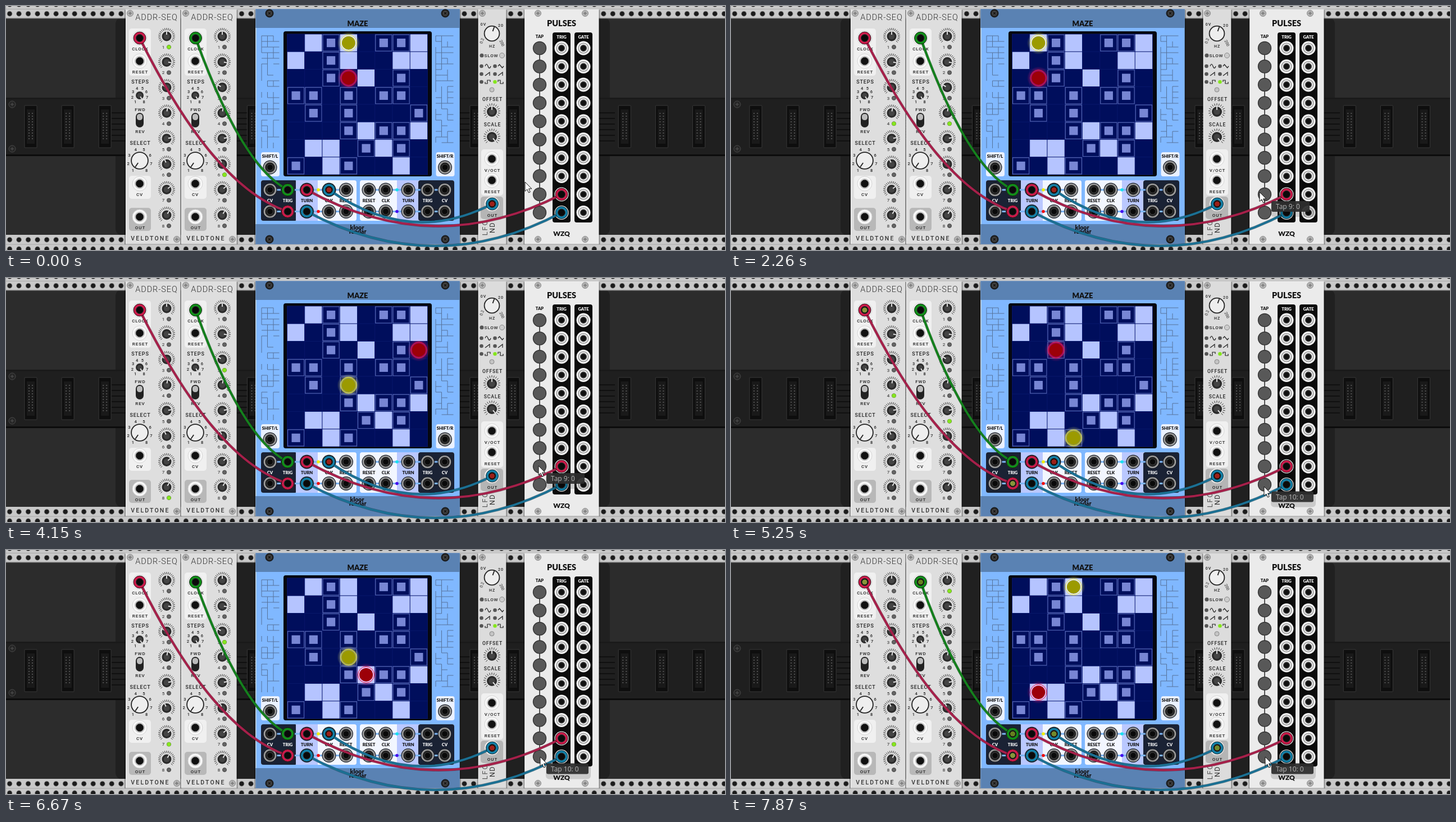
These frames come from a looping animation (1280 by 434 pixels, 7990 ms). An HTML page:

```html
<!DOCTYPE html>
<html lang="en">
<head>
<meta charset="utf-8">
<title>Maze sequencer patch</title>
<style>
html, body { margin: 0; width: 100%; height: 100%; overflow: hidden; background: #232323; }
svg { display: block; width: 1280px; height: 434px; }
text { font-family: Roboto, sans-serif; text-anchor: middle; }
.h { font-family: Lato, sans-serif; font-weight: 900; }
.tip { font-family: "Open Sans", sans-serif; text-anchor: start; }
.halo { mix-blend-mode: screen; }
</style>
</head>
<body>
<svg id="stage" viewBox="0 0 1280 434"></svg>
<script>
const LOOP = 7990, HP = 16.52;
const C = (x, y, r, f, a = '') => `<circle cx="${x}" cy="${y}" r="${r}" fill="${f}" ${a}/>`;
const R = (x, y, w, h, f, rx = 0, a = '') => `<rect x="${x}" y="${y}" width="${w}" height="${h}" rx="${rx}" fill="${f}" ${a}/>`;
const P = (d, s, w = 1, a = '') => `<path d="${d}" fill="none" stroke="${s}" stroke-width="${w}" ${a}/>`;
const T = (x, y, s, z, f = '#222', a = '') => `<text x="${x}" y="${y + z * .36}" font-size="${z}" fill="${f}" ${a}>${s}</text>`;
const G = (s, a) => `<g ${a}>${s}</g>`;
const edge = (c, w = 1) => `stroke="${c}" stroke-width="${w}"`;
const many = (n, f) => Array.from({ length: n }, (_, i) => f(i)).join('');
const label = (x, y, s, z = 8) => T(x, y, s, z, '#222', 'font-weight="500" letter-spacing=".9"');
const head = (x, y, s, z, f = '#111') => T(x, y, s, z, f, 'class="h"');

let seed = 11;
const rnd = () => (seed = seed * 16807 % 2147483647) / 2147483647;

// shared parts
const screw = (x, y, f = '#b4b4b4') => C(x, y, 5.5, f, edge('#8a8a8a')) + P(`M${x - 3} ${y}h6M${x} ${y - 3}v6`, '#777', 1.4);
const darkScrew = (x, y) => C(x, y, 7, '#222', edge('#111')) + C(x, y, 4.5, '#444') + P(`M${x - 2} ${y - 2}l4 4M${x + 2} ${y - 2}l-4 4`, '#151515', 1.6);
const jack = (x, y) => C(x, y, 13, '#f8f8f8', edge('#d5d5d5')) + C(x, y, 8.6, '#ddd', edge('#aaa', .8)) + C(x, y, 6.8, '#111', edge('#444', 1));
const darkJack = (x, y) => C(x, y, 12.5, '#20242c') + C(x, y, 10.5, '#777', edge('#bbb', 1.2)) + C(x, y, 7.5, '#333', edge('#111', 1.5)) + C(x, y, 4.8, '#0a0a0a');
const ringJack = (x, y) => C(x, y, 12.5, '#f4f4f4') + C(x, y, 8.8, '#eee', edge('#888', 1.3)) + C(x, y, 5.5, '#111', edge('#555', 1.3));
const ticks = (x, y, r, n) => P(many(n, i => {
  const a = (-135 + 270 * i / (n - 1)) * Math.PI / 180, s = Math.sin(a), c = -Math.cos(a);
  return `M${x + s * r} ${y + c * r}L${x + s * (r + 4)} ${y + c * (r + 4)}`;
}), '#333', 1);
const knob = (x, y, r, ang, white) => (white
  ? C(x, y, r + 1.8, '#222') + C(x, y, r, '#eee')
  : C(x, y, r, '#2b2b2b') + C(x, y, r * .62, '#444')) +
  P(`M${x} ${y - r * .35}V${y - r}`, white ? '#222' : '#eee', 1.8, `transform="rotate(${ang} ${x} ${y})"`);
// digits 1..8 on an arc around a knob
const dial = (x, y, r) => many(8, i => {
  const a = (-145 + 290 * i / 7) * Math.PI / 180;
  return T(x + Math.sin(a) * r, y - Math.cos(a) * r, i + 1, 7.5, '#222', 'font-weight="500"');
});
const wave = (x, y, k) => P(`M${x - 5} ${y}` + ['q2.5 -7 5 0t5 0', 'l2.5 -3 5 6 2.5 -3', 'm0 3l8 -6v6', 'v3h4v-6h5v3', 'v-3h4v6h5v-3'][k], '#222', 1.2);

const brand = 'VELDTONE';
const LEDY = i => 73 + 45.43 * i;

function rack() {
  let s = R(0, 0, 1280, 434, '#2c2c2c') + R(195, 20, 880, 388, '#202020', 12) +
    R(0, 163, 1280, 103, '#1f1f1f') + R(0, 163, 1280, 3, '#1a1a1a') + R(0, 264, 1280, 3, '#0c0c0c');
  s += P([[188, 213], [411, 429], [808, 826], [848, 892], [1055, 1084]]
    .map(([a, b]) => many(6, i => `M${a} ${190 + i * 10}H${b}`)).join(''), '#101010', 2);
  s += many(20, i => {
    const x = 33 + 4 * HP * i;
    return R(x, 177, 22, 75, '#0e0e0e', 1, edge('#383838')) + R(x + 4, 184, 14, 61, '#191919') +
      P(`M${x + 8} 190v50M${x + 14} 190v50`, '#505050', 2, 'stroke-dasharray="2 3"');
  });
  s += [175, 254].map(y => C(11, y, 6, '#262626', edge('#4a4a4a')) + P(`M8 ${y}h6M11 ${y - 3}v6`, '#555')).join('');
  s += R(0, 0, 1280, 22, '#c9c9c9') + R(0, 21, 1280, 1.5, '#909090') + R(0, 407, 1280, 27, '#c9c9c9') +
    P('M0 5.5H1280M0 424H1280', '#a8a8a8');
  return s + [-2.8, 13.8, 415.7, 432.3].map(y => many(78, i => C(6.5 + HP * i, y, 4.5, '#1c1c1c', edge('#999', .8)))).join('');
}

const panel = (x, w, f) => R(x - 2, 7, w + 4, 417, '#000', 0, 'opacity=".3"') + R(x, 5.5, w, 418, f) + P(`M${x + .5} 6v417`, '#f4f4f4');

function addrSeq(x) {
  const c = x + 25, k = x + 73, ang = [0, 100, -60, 10, 80, -25, 50, 30];
  return panel(x, 98.6, '#dedede') + screw(x + 8, 13) + screw(x + 91, 415) +
    T(x + 55, 19.5, 'ADDR-SEQ', 14.5, '#333', 'font-weight="300" letter-spacing=".9"') +
    R(x + 6, 40, 39, 84, '#f0f0f0', 5) + jack(c, 57) + label(c + 1, 76, 'CLOCK') + jack(c, 98) + label(c + 1, 117, 'RESET') +
    label(c + 1, 135, 'STEPS', 9) + knob(c, 159, 7, 150) + dial(c, 159, 13.5) +
    label(c + 1, 184, 'FWD') + R(c - 7, 190, 14, 26, '#222', 7) + R(c - 5, 192, 10, 11, '#bbb', 4.5) + label(c + 1, 223, 'REV') +
    label(c + 1, 244, 'SELECT', 9) + knob(c, 275, 14, -145, 1) + dial(c, 275, 21) +
    R(x + 6, 302, 39, 41, '#f0f0f0', 5) + jack(c, 316) + label(c, 335, 'CV') +
    R(x + 6, 359, 39, 41, '#b8b8b8', 5) + jack(c, 375) + label(c + 1, 394, 'OUT') +
    T(x + 44, 413.5, brand, 10.5, '#333', 'letter-spacing="2.2" font-weight="500"') +
    many(8, i => ticks(k, 54 + 45.43 * i, 11, 21) + knob(k, 54 + 45.43 * i, 8.5, ang[i]) +
      T(x + 67, LEDY(i), i + 1, 8, '#222') + C(x + 77, LEDY(i), 3.5, '#666', edge('#444')));
}

const CELL = 31.25, at = (v, o) => o + CELL * (v + .5);
const grid = ['.LBL.BBL', 'L.BL..LL', '..B.L.B.', 'BB.B.BB.', '.B.B...B', '...BLBBL', '.LL.BLB.', 'B.LB..L.'];

function scribble(x0) {
  let d = '';
  for (let y = 0; y < 20; y++) for (let x = 0; x < 3; x++) {
    const px = x0 + x * 10.5, py = 53 + y * 10;
    if (rnd() < .62) d += `M${px} ${py}h10.5`;
    if (rnd() < .58) d += `M${px} ${py}v10`;
  }
  return P(d, '#567299', 1);
}

function maze() {
  let s = panel(444.3, 363.4, '#80b8ff') + R(444.3, 5.5, 363.4, 33.5, '#5a82b3') + R(444.3, 388, 363.4, 35.5, '#5a82b3') +
    [469, 782].map(x => darkScrew(x, 13) + darkScrew(x, 415)).join('') + head(626, 31, 'MAZE', 13) +
    scribble(455) + scribble(765) +
    R(494, 45, 264, 258, '#05060f', 4) + R(500.5, 50, 250, 250, '#000e5c');
  grid.forEach((row, r) => [...row].forEach((c, i) => {
    const x = 500.5 + i * CELL, y = 50 + r * CELL;
    s += R(x, y, CELL, CELL, c === 'L' ? '#b5c4ff' : '#000e5c', 0, edge('#08186c', .8));
    if (c === 'B') s += R(x + 1, y + 1, 29.2, 29.2, '#000e5c', 0, edge('#5262b0', 1.3)) + R(x + 8, y + 8, 15.2, 15.2, '#7886d4');
  }));
  for (const [x, n] of [[470, 'L'], [781.5, 'R']])
    s += R(x - 16, 260, 33, 43, '#eaf1ff', 4) + head(x, 267.5, 'SHIFT/' + n, 7.6) + darkJack(x, 287);
  s += R(454, 310, 170, 72, '#f2f6ff', 4) + R(454, 310, 64, 72, '#1a2234', 4) + R(516, 310, 39, 72, '#bac8ff') +
    R(630, 310, 168, 72, '#f2f6ff', 4) + R(696, 310, 39, 72, '#bac8ff') + R(734, 310, 64, 72, '#1a2234', 4);
  for (const y of [327, 365.5]) {
    s += P(`M470 ${y}H605M646 ${y}H781`, '#7db4f2', 3);
    for (const x of [470, 501.5, 535.5, 575, 605.5, 646, 676, 716, 750.5, 781]) s += darkJack(x, y);
  }
  ['CV', 'TRIG', 'TURN', 'CLK', 'RESET'].forEach((n, i) => {
    const f = i < 2 ? '#fff' : '#111';
    s += head([470, 501.5, 535.5, 575, 605][i], 346, n, 7.6, f) + head([781, 750.5, 716, 676, 646][i], 346, n, 7.6, f);
  });
  return s + C(556, 327, 2.8, '#f2ee00') + C(556, 365.5, 2.8, '#f01010') + C(696, 327, 2.8, '#18e0f0') + C(696, 365.5, 2.8, '#4410f0') +
    head(625, 394, 'kloor', 10.5) + head(626, 401.5, 'fendar', 10.5);
}

function lfo() {
  let s = panel(840.8, 49.5, '#dcdcdc') + screw(848, 13) + knob(865, 49, 12.5, 20, 1) +
    label(850, 32, '0V', 7) + label(881, 34, '20', 7) +
    T(847, 62, '0.2', 7, '#222', 'transform="rotate(-70 847 62)"') + T(883, 66, '200', 7, '#222', 'transform="rotate(65 883 66)"') +
    label(865.5, 71, 'HZ', 7) + C(847, 88, 3.5, '#555') + label(864, 88, 'SLOW') + C(883, 88, 4.5, '#ccc', edge('#888'));
  [107, 121, 135].forEach((y, r) => {
    s += C(846.5, y, 3.3, '#555') + wave(858, y, [0, 2, 3][r]) + C(870.5, y, 3.3, r > 1 ? '#86e61e' : '#555') + wave(881, y, [1, 2, 4][r]);
  });
  return s + C(865, 149, 4, '#c4c4c4', edge('#888')) +
    label(866, 166, 'OFFSET', 8.6) + ticks(865, 188, 11, 17) + knob(865, 188, 9, 0) +
    label(866, 211, 'SCALE', 8.6) + ticks(865, 233, 11, 17) + knob(865, 233, 9, 140) +
    R(846, 255, 39, 82, '#f0f0f0', 5) + jack(865, 272) + label(866, 292, 'V/OCT') + jack(865, 310) + label(866, 330, 'RESET') +
    R(845, 339, 40, 40, '#b5b5b5', 5) + jack(865, 352) + label(866, 372, 'OUT') +
    T(852, 394, 'LFO', 12.5, '#555', 'transform="rotate(-90 852 394)" letter-spacing="2"') +
    T(865, 394, 'ND', 12.5, '#333', 'transform="rotate(-90 865 394)" letter-spacing="1.5"');
}

const tapY = i => 75 + 32.5 * i;
function pulses() {
  return panel(923.4, 132.1, '#ebebeb') + [947, 1031].map(x => screw(x, 13) + screw(x, 415)).join('') +
    head(989, 31, 'PULSES', 14.5) + head(950, 54, 'TAP', 7.6) +
    R(973, 47, 32, 338, '#0b0b0b', 4) + R(1012, 47, 32, 338, '#0b0b0b', 4) +
    head(989, 55, 'TRIG', 7.6, '#fff') + head(1028, 55, 'GATE', 7.6, '#fff') + P('M950 75V367', '#222', 1.5) +
    many(10, i => C(950, tapY(i), 11.5, '#585858', edge('#333', 1.4)) + ringJack(989, tapY(i)) + ringJack(1028, tapY(i))) +
    head(989, 405, 'WZQ', 12);
}

// cables hang from the midpoint by a share of their length
const RED = ['#a6204a', '#cc1a4a'], GREEN = ['#14801d', '#109018'], BLUE = ['#1b7093', '#1280a8'];
const cables = [
  [238, 57, 501.5, 365.5, RED], [337.5, 57, 501.5, 327, GREEN], [575, 327, 865.5, 352, BLUE],
  [535.5, 327, 989, 335, RED], [535.5, 365.5, 989, 367.5, BLUE]];
const plug = (x, y, f) => C(x, y, 11, f, edge('#000', .8)) + C(x, y, 6.5, '#0a0a0a', edge('#333'));
const wires = () => cables.map(([a, b, c, d, f]) => {
  const path = `M${a} ${b}Q${(a + c) / 2} ${(b + d) / 2 + .2 * (150 + Math.hypot(c - a, d - b))} ${c} ${d}`;
  return P(path, '#0005', 5) + P(path, f[0], 4);
}).join('') + cables.map(([a, b, c, d, f]) => plug(a, b, f[1]) + plug(c, d, f[1])).join('');

// the halo adds light, so it flares on bright cells
const glow = (id, f) => `<radialGradient id="${id}Glow"><stop offset=".7" stop-color="${f}"/><stop offset=".72" stop-color="${f}" stop-opacity=".5"/><stop offset="1" stop-color="${f}" stop-opacity="0"/></radialGradient>`;
const ball = (id, fill, ring) => glow(id, fill) + G(C(0, 0, 20.5, `url(#${id}Glow)`, 'class="halo"') +
  C(0, 0, 14.4, 'none', edge(ring, 1)) + C(0, 0, 12, fill), `id="${id}"`);
const lights = (id, f, ...pts) => G(pts.map(p => C(p[0], p[1], 4.6, f)).join(''), `id="${id}"`);

document.getElementById('stage').innerHTML = rack() + addrSeq(213) + addrSeq(312) + maze() + lfo() + pulses() +
  C(290, 0, 3.6, '#86e61e', 'id="led1"') + C(389, 0, 3.6, '#86e61e', 'id="led2"') +
  C(950, 0, 10.5, '#8a8a8a', 'id="tap"') + ball('yellow', '#9b9a00', '#e6e436') + ball('red', '#9c0008', '#e01c40') +
  wires() + lights('clk', '#9c2018', [575, 327], [865.5, 352]) + lights('clkOn', '#6f8a2c', [575, 327], [865.5, 352]) +
  lights('trig1', '#86963a', [238, 57], [501.5, 365.5]) + lights('trig2', '#66801f', [337.5, 57], [501.5, 327]) +
  G(R(961, 349, 80, 26, '#000', 6, 'opacity=".14"') + R(962, 347, 68, 19, '#2e2e2e', 3, 'id="tipBox" opacity=".93"') +
    '<text id="tipText" class="tip" x="970" y="361" font-size="12" fill="#b4b4b4"></text>', 'id="tip"') +
  '<path id="cursor" d="M0 0V16.5L3.8 13L6.5 19L9.2 17.8L6.6 12H11.8Z" fill="#fff" stroke="#111" stroke-width="1"/>';

const el = id => document.getElementById(id);
const set = (id, k, v) => el(id).setAttribute(k, v);
const show = (id, on) => set(id, 'visibility', on ? 'visible' : 'hidden');

const moves = [190, 420, 850, 1290, 1710, 2040, 2380, 2710, 3040, 3370, 3690, 4030, 4370, 4690, 5040, 5370, 5700, 6010, 6340, 6570, 6880, 7200, 7540, 7870];
const steps1 = [190, 670, 1070, 2380, 2600, 2820, 3040, 4690, 4900, 5040, 5150, 5370, 6010, 6340];
const steps2 = [420, 520, 670, 780, 850, 950, 2380, 2500, 2710, 2820, 2930, 3040, 3160, 4690, 5040, 5370, 5470, 5700, 5800, 6340, 6570, 6880, 7000, 7100, 7540, 7660, 7870];
const hits1 = [670, 2380, 3040, 5040, 5700, 6880, 7870];
const hits2 = [420, 850, 1290, 2380, 2710, 3040, 5370, 5700, 7540, 7870];
const silent = [190, 1710];
const clicks = [[2820, 2980], [5800, 5950], [7000, 7200]];
const track = [[0, 924, 313], [1940, 924, 313], [2160, 941, 331], [2380, 941, 331], [2720, 948, 334], [4690, 948, 334], [5150, 949, 371], [5360, 949, 371], [5470, 951, 368], [LOOP, 951, 368]];

const passed = (list, t) => list.filter(m => m <= t).length;
const lit = (list, t, dur) => list.some(m => t >= m && t - m < dur);
const place = (id, x, y) => set(id, 'transform', `translate(${x} ${y})`);

function draw(t) {
  const n = passed(moves, t);
  place('yellow', at((3 + Math.min(n, 8)) % 8, 500.5), at(Math.max(0, n - 8) % 8, 50));
  const left = Math.max(0, n - 21), down = Math.min(4, Math.max(0, n - 17));
  place('red', at((3 + Math.min(n, 17) - left) % 8, 500.5), at(2 + down, 50));
  set('led1', 'cy', LEDY(passed(steps1, t) % 8));
  set('led2', 'cy', LEDY((5 + passed(steps2, t)) % 8));
  show('clkOn', lit(moves.filter(m => !silent.includes(m)), t, 100));
  show('trig1', lit(hits1, t, 230));
  show('trig2', lit(hits2, t, 230));

  const ten = t >= 4900, pressed = clicks.some(([a, b]) => t >= a && t < b);
  show('tap', pressed);
  set('tap', 'cy', tapY(ten ? 9 : 8));
  show('tip', t >= 2160);
  place('tip', 0, ten ? 32.5 : 0);
  set('tipBox', 'width', ten ? 75 : 68);
  el('tipText').textContent = `Tap ${ten ? 10 : 9}: ${pressed ? 1 : 0}`;

  const i = track.findIndex(k => k[0] > t), a = track[i - 1], b = track[i];
  const u = (t - a[0]) / (b[0] - a[0]);
  place('cursor', a[1] + (b[1] - a[1]) * u, a[2] + (b[2] - a[2]) * u);
}

function tick() {
  draw(performance.now() % LOOP);
  requestAnimationFrame(tick);
}
tick();
</script>
</body>
</html>
```
